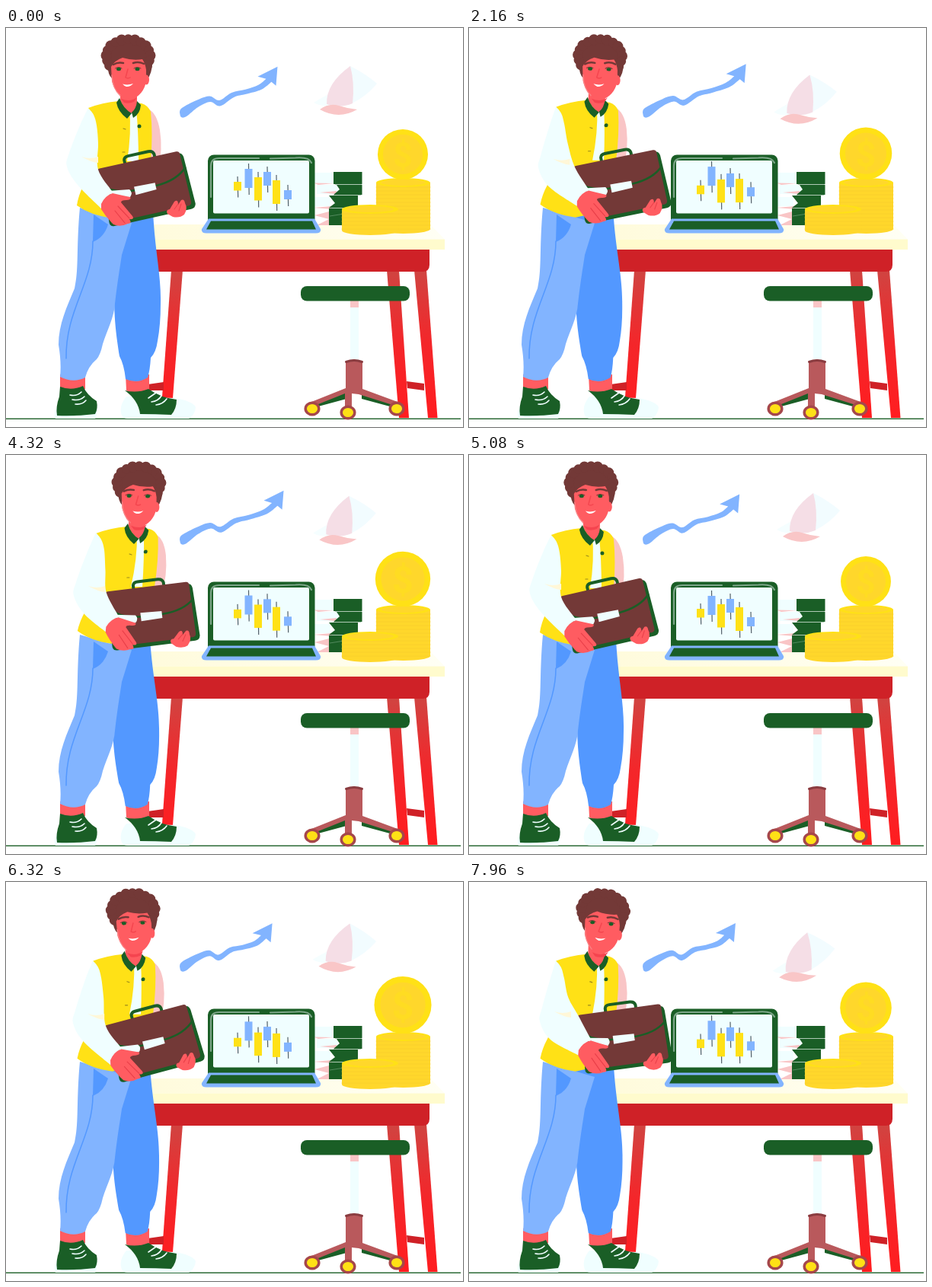
Write an HTML page that moves like this. It is 600 by 524 pixels and loops after 8000 ms.

```html
<!DOCTYPE html>
<html lang="en">
<head>
<meta charset="utf-8">
<title>Desk scene</title>
<style>
html, body { margin: 0; width: 100%; height: 100%; overflow: hidden; background: #fff; }
svg { display: block; width: 100%; height: 100%; }
.green { fill: #1a5e26; } .red { fill: #cf2127; } .brown { fill: #733937; }
.skin { fill: #ff5c61; } .light { fill: #82b4ff; } .blue { fill: #5398ff; }
.pale { fill: #f0feff; } .yellow { fill: #ffe116; } .pink { fill: #f9c5c6; }
.gold { fill: #ffd72b; } .base { fill: #b9595c; }
.line { fill: none; stroke-linecap: round; stroke-linejoin: round; }
</style>
</head>
<body>
<svg viewBox="0 0 600 524">
  <defs>
    <linearGradient id="leg" x1="0" y1="0" x2="0" y2="1">
      <stop offset="0" stop-color="#d04441"/><stop offset=".5" stop-color="#f4262a"/><stop offset="1" stop-color="#ff1d20"/>
    </linearGradient>
    <linearGradient id="top" x1="0" y1="0" x2="1" y2="0">
      <stop offset="0" stop-color="#fffbdc"/><stop offset="1" stop-color="#fffff4"/>
    </linearGradient>
  </defs>
  <path d="M0 513.3H597" stroke="#2c6b36" stroke-width="1.6"/>

  <!-- table -->
  <g fill="url(#leg)">
    <path d="M500 318H516L529 512H516Z"/>
    <path d="M536 318H552L566.500 512H554Z"/>
    <path d="M217 318H232L217 512H203Z"/>
  </g>
  <path class="red" d="M526 464L549 467V476L527 473ZM186 468L207 465V476H186Z"/>
  <path class="red" d="M190 290H556V311Q556 320 547 320H190Z"/>
  <path fill="url(#top)" d="M190 258H557L576 277.500H190Z"/>
  <path fill="#fffbcd" d="M190 277.500H576V291H190Z"/>

  <!-- stool -->
  <rect class="pink" x="452" y="356" width="11" height="11"/>
  <rect class="pale" x="452" y="367" width="11" height="70"/>
  <path class="green" d="M447 478L408 493L410 497L447 487ZM467 478L506 493L504 497L467 487Z"/>
  <path class="base" d="M446 438Q457 433 468 438V474L514 491L511 496L463 481L454 480V499H445V480L405 496L401 491L446 473Z"/>
  <path d="M446.500 438.500Q457 434.500 467.500 438.500" class="line" stroke="#8a3c40" stroke-width="3"/>
  <g class="yellow" stroke="#a5474b" stroke-width="3.500">
    <ellipse cx="402" cy="500" rx="8.800" ry="7.800"/><ellipse cx="449" cy="505" rx="8.800" ry="7.800"/><ellipse cx="513" cy="500" rx="8.800" ry="7.800"/>
  </g>
  <rect class="green" x="387" y="339" width="143" height="19.500" rx="8"/>

  <!-- books -->
  <path class="pale" d="M404 190H432V204H404ZM408 206H436V218H408ZM404 222H426V234H404Z"/>
  <path class="pink" d="M404 203.500L430 204L410 206ZM412 216L434 214V218ZM404 236L428 234V238ZM405 246L428 240V259H408L424 251Z"/>
  <path class="green" d="M430 189H467.500V205H430ZM434 206H467.500V219H430L438 212ZM424 220H462V236H424L432 230ZM424 237H445V259H424Z"/>
  <path d="M432 205.500H467M430 219.500H466M424 236.500H460M425 247L444 244" stroke="#7aa683" stroke-width=".6"/>

  <!-- laptop -->
  <rect class="green" x="265" y="166.500" width="140.500" height="92" rx="8"/>
  <rect class="pale" x="272" y="174" width="126" height="69.500" rx="2"/>
  <g class="line" stroke="#7ba487" stroke-width="2.200"><path d="M269 222V181Q269 171 280 171H332"/><path d="M347 171.500L380 170.500Q398 169 401 177"/></g>
  <path class="light" d="M266 250.500H405L413 264Q414 269.500 407 269.500H263Q256 269.500 257 264Z"/>
  <path class="green" d="M269 253.500H402L407 264.500H263Z"/>
  <g id="candles"></g>

  <!-- coins -->
  <g id="coin">
    <circle class="yellow" cx="521" cy="165.500" r="33.500"/>
    <circle class="gold" cx="521" cy="165.500" r="26.500"/>
    <text x="521" y="182" text-anchor="middle" font-family="Roboto, sans-serif" font-weight="700" font-size="45" fill="#ffdc22">$</text>
  </g>
  <g id="stacks"></g>

  <path id="arrow" class="light"/>
  <g id="paper">
    <path fill="#f5feff" d="M404 98Q415 91 424 87L424 102Q412 103 404 98Z"/>
    <path fill="#f2fcff" d="M452 50Q472 60 487 73Q473 90 454 99Z"/>
    <path fill="#f5dee6" d="M452 50Q420 73 421 100Q438 106 455 99Q458 72 452 50Z"/>
    <path fill="#f9c6c7" d="M412 107Q424 98 437 102Q449 106 461 107Q437 121 412 107Z"/>
  </g>

  <!-- legs and shoes -->
  <path class="skin" d="M71 455H104V474Q86 482 71 473ZM157 455H188V477Q172 484 158 476Z"/>
  <path class="pale" d="M66 498Q62 507 65 513H117Q121 506 119 498ZM158 484Q149 495 151 505Q152 513 160 513H240Q248 508 249 498Q245 490 222 486Z"/>
  <path class="green" d="M71 471Q86 477 101 470Q106 482 119 490Q121 500 117 507Q92 510 67 509Q65 498 70 484Z"/>
  <path class="green" d="M156 476Q172 480 187 474Q204 486 224 488Q224 500 217 508Q196 507 176 507Q174 489 156 476Z"/>
  <g class="line" stroke="#f0feff" stroke-width="1.600"><path d="M84 482Q93 484 99 478M87 488Q97 490 103 484M91 494Q100 495 105 489"/><path d="M187 486L197 479M191 491Q200 490 204 483M197 495Q206 494 211 487"/></g>
  <g id="rightLeg">
    <path class="blue" d="M140 240H193C195 290 204 325 203 362Q203 390 199 411Q197 426 190 433Q189 450 186 459Q172 468 157 461Q155 442 149 431C145 405 142 385 142 350Z"/>
  </g>
  <path class="light" d="M97 236C92 290 96 315 90 342C80 366 69 389 69 416Q73 440 71 458Q88 467 104 459Q108 444 119 435Q124 429 127 415C133 396 142 380 143 362C146 335 149 318 152 298L165 256Z"/>
  <path class="blue" d="M115 245L134 258Q129 275 114 281Z"/>
  <path class="line" stroke="#5398ff" stroke-width="1.500" d="M114 280C114 336 78 370 79 434"/>

  <!-- upper body -->
  <g id="torso">
    <path class="pink" d="M186 106Q198 111 202 134Q206 160 200 185L180 185Z"/>
    <path class="yellow" d="M108 105Q126 98 148 96L178 99Q187 102 190 110Q193 140 190 175L186 240L140 250Q111 246 93 233Q95 220 101 208L118 170Z"/>
    <path class="pale" d="M162 106H171Q174 138 174 175H159Q165 138 162 106Z"/>
    <path class="skin" d="M150 84H172V101Q168 112 164 112Q155 106 150 95Z"/>
    <path class="green" d="M149 92Q154 106 165 112L159 119Q147 110 145 98ZM172 96L177 101Q176 113 167 118L165 111Q171 106 172 96Z"/>
    <circle class="green" cx="175" cy="129" r="2.500"/>
    <path class="line" stroke="#9c8a1c" stroke-width="1.200" d="M154 132L157 133M153 163H156"/>
  </g>

  <g id="head">
    <g id="hair" class="brown"><ellipse cx="161" cy="37" rx="28" ry="24"/></g>
    <path class="brown" d="M133 48L141 46L139 66Q134 62 133 48ZM180 44H192Q192 60 185 68Z"/>
    <ellipse class="skin" cx="184.500" cy="68" rx="3.500" ry="6.500"/>
    <path class="skin" d="M138 51Q142 43 153 39Q166 43 179 41Q183 47 184 55L184 70Q181 88 163 95Q144 89 139 70Z"/>
    <path fill="#f5444f" d="M151 93Q163 98 172 91L168 97Q161 100 155 98Z"/>
    <path class="line" stroke="#733937" stroke-width="2.500" d="M141 48Q147 44.500 154 46M167 46Q174 43.500 181 47"/>
    <path class="line" stroke="#733937" stroke-width="1" d="M143.500 53Q148 50 152 53M168 53Q172 50 177 53"/>
    <g class="green"><ellipse cx="148" cy="54" rx="3" ry="2.200"/><ellipse cx="172.500" cy="54" rx="3" ry="2.200"/></g>
    <path class="line" stroke="#f4464f" stroke-width="1.500" d="M160 54L157 65Q160 67 163 65"/>
    <path class="line" stroke="#f98385" stroke-width="1.300" d="M139 62Q140 80 150 89"/>
    <path fill="#fff" d="M153 73.500Q160 75.500 167 73Q163 77.500 158 77Q155 76 153 73.500Z"/>
  </g>

  <g class="held">
    <g transform="translate(184 211) rotate(-12.500)">
      <path class="line" stroke="#1a5e26" stroke-width="4" d="M-20 -36V-43Q-19 -47 -14 -47H13Q19 -47 20 -42V-36"/>
      <path class="green" d="M-52 -36H50Q56 -37 57 -30L59 33Q58 39 52 39H-51Q-57 39 -57 33Z"/>
      <path class="brown" d="M-54 -39H49Q53 -39 53 -35L54 29Q54 34 49 34H-50Q-55 34 -55 29L-58 -35Q-58 -39 -54 -39Z"/>
      <path class="line" stroke="#1a5e26" stroke-width="2.500" d="M56 -16Q42 -2 14 -1M-14 -1Q-42 -2 -56 -17"/>
      <path class="pale" d="M-15 -6L13 -5V4L-15 5Z"/>
    </g>
    <path class="skin" d="M212 244Q209 239 215 238L221 228Q226 224 226 232L230 226Q234 224 235 230Q239 237 234 245Q228 250 219 248Z"/>
    <path class="line" stroke="#e83f49" stroke-width="1" d="M221 238L226 231M227 240L230 231"/>
  </g>

  <path id="sleeve" class="pale"/>
  <path id="fold" fill="#fff7d8" d="M99 169Q110 173 121 169L121 177Q111 176 99 169Z"/>
  <g class="held">
    <path class="pale" d="M134 214L162 212Q167 216 163 222L140 222Z"/>
    <path class="skin" d="M125 231Q130 220 140 217Q153 220 163 222Q165 226 158 226Q151 226 151 229L166 247Q169 252 162 251Q166 257 160 257Q150 262 141 258Q131 248 125 238Z"/>
    <path class="line" stroke="#e83f49" stroke-width="1.100" d="M147 234L162 250M143 240L156 256"/>
  </g>
</svg>

<script>
const BODY_LOOP = 5000, PROP_LOOP = 2500;
const $ = id => document.getElementById(id);
const fix = n => n.toFixed(2);
const make = (parent, tag, attrs) => {
  const node = document.createElementNS(parent.namespaceURI, tag);
  for (const k in attrs) node.setAttribute(k, attrs[k]);
  return parent.appendChild(node);
};
const place = (node, transform) => node.setAttribute('transform', transform);

// time, case x, y, turn; shoulder x; head x, turn; elbow x, y; hip x; paper x, y, turn
const POSES = [
  [0,    0, 0, 0,           0,  0, 0,   0, 0,   0,  0, 0, 0],
  [1280, 10.8, .6, -2.6,    6,  8, -2,  8, 4,  -4, -1, 4, 1],
  [3040, 20.3, -5.2, 5,     6, 11, 5,  13, 1,  -3, -6, 17, -3],
  [4320, 8, .5, 5.5,       10, 13, 1,   9, 3,  -4, -1, 4, -1]
];
// phase within the shorter loop, sideways reach of the arrow tip
const REACH = [[0, .5], [.2, -6.5], [.36, -9.3], [.5, -8], [.728, 8.5], [.83, 9]];

// Periodic cubic interpolation over rows that begin with their time
function sample(rows, time, span) {
  const n = rows.length;
  const t = time % span;
  const at = i => rows[(i % n + n) % n];
  const when = i => at(i)[0] + Math.floor(i / n) * span;
  let i = n - 1;
  while (when(i) > t) i--;
  const step = when(i + 1) - when(i);
  const u = (t - when(i)) / step;
  return rows[0].slice(1).map((_, c) => {
    const v = j => at(j)[c + 1];
    const slope = j => (v(j + 1) - v(j - 1)) / (when(j + 1) - when(j - 1)) * step;
    const a = v(i), b = v(i + 1), d = b - a;
    return a + u * (slope(i) + u * (3 * d - 2 * slope(i) - slope(i + 1) + u * (slope(i) + slope(i + 1) - 2 * d)));
  });
}

// Smooth open curve through points, as path commands after the first point
function curve(points) {
  const p = i => points[Math.max(0, Math.min(points.length - 1, i))];
  return points.slice(1).map((end, i) => {
    const c1 = [0, 1].map(k => p(i)[k] + (end[k] - p(i - 1)[k]) / 6);
    const c2 = [0, 1].map(k => end[k] - (p(i + 2)[k] - p(i)[k]) / 6);
    return 'C' + [...c1, ...c2, ...end].map(fix).join(' ');
  }).join('');
}

const candles = [
  [304, 202, 11.5, 5], [318.5, 185, 25, -3], [331, 196, 30.5, 3],
  [343, 189, 18, 2], [355, 200, 31, -2], [370, 213, 12, -4]
].map(([x, y, h, drift], i) => {
  const g = make($('candles'), 'g', {});
  make(g, 'path', { d: `M${x} ${y - 7}L${x + .7} ${y + h + 9}`, stroke: '#53606a', 'stroke-width': 1.2 });
  make(g, 'rect', { x: x - 5, y, width: 10, height: h, class: i % 2 ? 'light' : 'yellow' });
  return { g, drift };
});

function stack(x, w, top, bottom) {
  const r = w / 2, box = $('stacks');
  make(box, 'path', { class: 'gold', d: `M${x} ${top}V${bottom}A${r} 6 0 0 0 ${x + w} ${bottom}V${top}Z` });
  for (let y = top + 6; y <= bottom; y += 5)
    make(box, 'path', { class: 'line', stroke: '#f8cf2b', 'stroke-width': .8, d: `M${x} ${y}H${x + w}` });
  make(box, 'ellipse', { class: 'yellow', cx: x + r, cy: top, rx: r, ry: 6 });
  make(box, 'ellipse', { class: 'gold', cx: x + r, cy: top, rx: r - 6, ry: 4 });
}
stack(486, 71, 203, 264);
stack(441, 74, 238, 266);

for (let i = 0; i < 15; i++) {
  const a = Math.PI * (.82 + i / 14 * 1.36);
  make($('hair'), 'circle', { cx: fix(160.5 + 29 * Math.cos(a)), cy: fix(37 + 22.5 * Math.sin(a)), r: i % 2 ? 6.3 : 7 });
}

function drawArrow(reach) {
  const move = ([x, y]) => {
    const u = Math.max(0, (x - 232) / 112);
    const pull = reach * Math.min(1, u * u);
    return [x + pull, y - pull * .5];
  };
  const upper = [[228, 111], [231, 105], [250, 95], [267, 89.5], [280, 95], [296, 85], [314, 81], [331, 75], [341, 67]].map(move);
  const lower = [[348, 71], [335, 81], [315, 87], [299, 91], [281, 102.5], [268, 97], [252, 104], [237, 116], [230, 117], [228, 111]].map(move);
  const head = [[330, 64], [356, 51], [354, 76], [348, 71]].map(([x, y]) => [x + reach, y - reach * .5]);
  $('arrow').setAttribute('d', `M${upper[0]}${curve(upper)}L${head.join('L')}L${lower[0]}${curve(lower)}Z`);
}

function drawSleeve(shoulder, ex, ey, held) {
  const s = ([x, y]) => [x + shoulder, y - shoulder * .3];
  const e = ([x, y]) => [x + ex, y + ey];
  const armpit = ([x, y]) => [x + (shoulder + ex) / 2, y];
  const outer = [s([108, 105]), armpit([97, 128]), e([83, 164]), e([80, 182]), e([94, 206]), held([126, 238])];
  const inner = [held([139, 214]), held([121, 186]), armpit([121, 152]), s([119, 128]), s([115, 114]), s([108, 105])];
  $('sleeve').setAttribute('d', `M${outer[0]}${curve(outer)}L${inner[0]}${curve(inner)}Z`);
  place($('fold'), `translate(${fix(ex)} ${fix(ey)})`);
}

function draw(time) {
  const [cx, cy, turn, shoulder, headX, headTurn, ex, ey, hip, px, py, paperTurn] = sample(POSES, time, BODY_LOOP);
  const phase = time / PROP_LOOP % 1;

  const heldMove = `translate(${fix(cx)} ${fix(cy)}) rotate(${fix(turn)} 184 211)`;
  document.querySelectorAll('.held').forEach(g => place(g, heldMove));
  const a = turn * Math.PI / 180, cos = Math.cos(a), sin = Math.sin(a);
  const held = ([x, y]) => [184 + cx + (x - 184) * cos - (y - 211) * sin, 211 + cy + (x - 184) * sin + (y - 211) * cos];
  drawSleeve(shoulder, ex, ey, held);

  const lean = shoulder / 140;
  place($('torso'), `matrix(1 0 ${(-lean).toFixed(4)} 1 ${fix(lean * 245)} ${fix(-shoulder * .2)})`);
  place($('head'), `translate(${fix(headX)} 0) rotate(${fix(headTurn)} 160 92)`);
  const sway = -hip / 240;
  place($('rightLeg'), `matrix(1 0 ${sway.toFixed(4)} 1 ${fix(-sway * 480)} 0)`);
  place($('paper'), `translate(${fix(px)} ${fix(py)}) rotate(${fix(paperTurn)} 440 85)`);

  const swing = (1 - Math.cos(time / BODY_LOOP * 2 * Math.PI)) / 2;
  candles.forEach(({ g, drift }) => place(g, `translate(0 ${fix(drift * swing)})`));

  const coinTop = 128.5 + 4.6 * Math.cos(2 * Math.PI * (phase - .045));
  place($('coin'), `translate(521 199) scale(${((199 - coinTop) / 67).toFixed(4)}) translate(-521 -199)`);
  drawArrow(sample(REACH, phase, 1)[0]);
}

const start = performance.now();
function tick() {
  draw((performance.now() - start) % 8000);
  requestAnimationFrame(tick);
}
tick();
</script>
</body>
</html>
```
